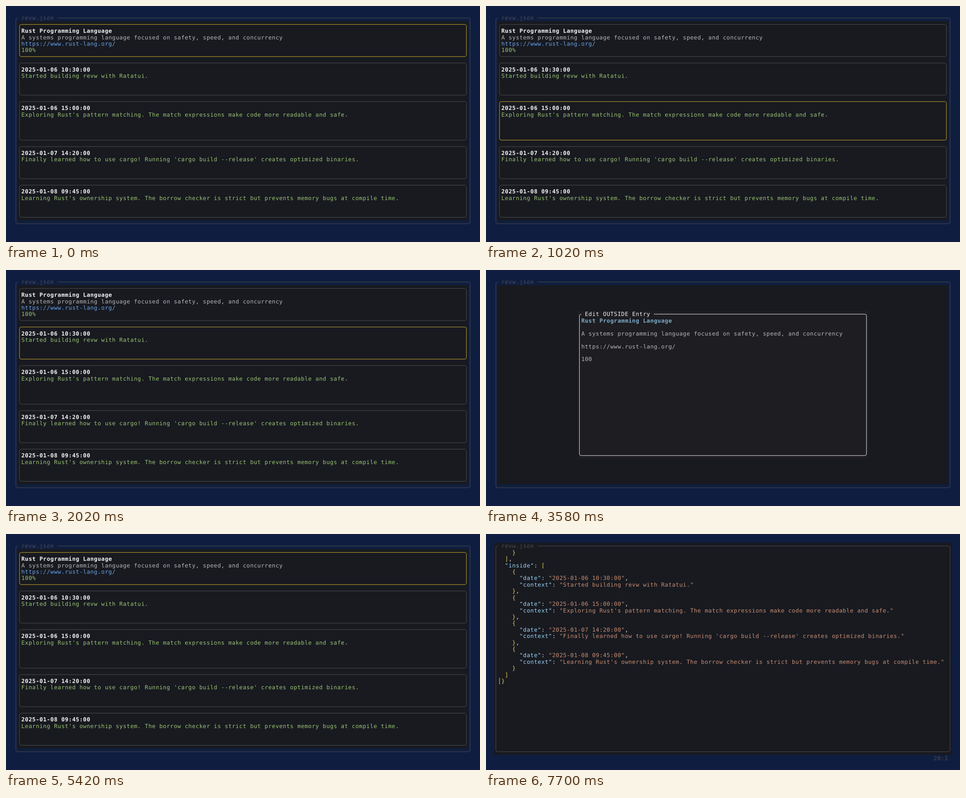
Write an HTML page that moves like this. It is 1058 px wide and 529 px high and loops after 8 s.

```html
<!DOCTYPE html>
<html lang="en">
<head>
<meta charset="utf-8">
<title>revw.json</title>
<style>
html, body { margin: 0; height: 100%; overflow: hidden; background: #0f1e40; }
svg { display: block; width: 100%; height: 100%; }
text {
  font: 12.6px "DejaVu Sans Mono", monospace;
  letter-spacing: calc(8.11px - .60205em);
  text-rendering: geometricPrecision;
  white-space: pre;
}
path { fill: none; stroke-width: 1; }
.bold { font-weight: bold; }
</style>
</head>
<body>
<svg id="stage" viewBox="0 0 1058 529"></svg>
<script>
const LOOP = 8000, CELL_W = 8.11, CELL_H = 14.41, RADIUS = 4;
const GRAY = '#4d4d4d', YELLOW = '#cfac30', GREEN = '#9bc274', SILVER = '#b6b6b6';
const DARK = '#181a20', POPUP = '#1e1d21';
const stage = document.getElementById('stage');

const data = {
  outside: [{
    name: 'Rust Programming Language',
    context: 'A systems programming language focused on safety, speed, and concurrency',
    url: 'https://www.rust-lang.org/',
    percentage: 100
  }],
  inside: [
    ['2025-01-06 10:30:00', 'Started building revw with Ratatui.'],
    ['2025-01-06 15:00:00', "Exploring Rust's pattern matching. The match expressions make code more readable and safe."],
    ['2025-01-07 14:20:00', "Finally learned how to use cargo! Running 'cargo build --release' creates optimized binaries."],
    ['2025-01-08 09:45:00', "Learning Rust's ownership system. The borrow checker is strict but prevents memory bugs at compile time."]
  ].map(([date, context]) => ({ date, context }))
};
const topic = data.outside[0];
const lines = JSON.stringify(data, null, 2).split('\n');
const cardRows = [[1, 6], [7, 12], [13, 19], [20, 25], [26, 31]];

// Left and top edge of a terminal cell
const px = col => 18 + col * CELL_W;
const py = row => 19.7 + row * CELL_H;

const text = (col, row, str, color, cls = '') =>
  `<text x="${px(col)}" y="${py(row) + 11.7}" fill="${color}" class="${cls}">${str}</text>`;

const fill = (c1, r1, c2, r2, color) =>
  `<rect x="${px(c1)}" y="${py(r1)}" width="${(c2 - c1 + 1) * CELL_W}" height="${(r2 - r1 + 1) * CELL_H}" fill="${color}"/>`;

// Rounded border through cell centres, with an optional title in the top line
function border(c1, r1, c2, r2, color, title = '') {
  const [l, t, r, b] = [px(c1 + .5), py(r1 + .5), px(c2 + .5), py(r2 + .5)];
  const k = RADIUS, start = title ? px(c1 + title.length + 3) : l + k;
  return `<path stroke="${color}" d="M${start} ${t}H${r - k}q${k} 0 ${k} ${k}V${b - k}q0 ${k} ${-k} ${k}` +
    `H${l + k}q${-k} 0 ${-k} ${-k}V${t + k}q0 ${-k} ${k} ${-k}"/>` +
    text(c1 + 2, r1, title, color);
}

const windowBorder = () => border(0, 0, 125, 32, GRAY, 'revw.json');

function cards(selected) {
  let out = fill(1, 1, 124, 31, DARK) + windowBorder();
  cardRows.forEach(([top, bottom], i) => {
    out += border(1, top, 124, bottom, i === selected ? YELLOW : GRAY);
    if (!i) return;
    const { date, context } = data.inside[i - 1];
    out += text(2, top + 1, date, '#f4f4f4', 'bold') + text(2, top + 2, context, GREEN);
  });
  return out + text(2, 2, topic.name, '#f4f4f4', 'bold') + text(2, 3, topic.context, SILVER) +
    text(2, 4, topic.url, '#67a3ea') + text(2, 5, topic.percentage + '%', GREEN);
}

function editor() {
  return fill(1, 1, 124, 31, DARK) + windowBorder() + fill(23, 5, 102, 27, POPUP) +
    border(23, 5, 102, 27, '#f0f0f0', 'Edit OUTSIDE Entry') +
    text(24, 6, topic.name, '#7babc9', 'bold') + text(24, 8, topic.context, SILVER) +
    text(24, 10, topic.url, SILVER) + text(24, 12, topic.percentage, SILVER);
}

function tokenColor(token, isKey) {
  if (token[0] === '"') return isKey ? '#9cd5f5' : '#c98d73';
  if (/\d/.test(token)) return '#b5cea8';
  return /[{}[\]]/.test(token) ? '#e9ca5c' : '#dedede';
}

function json(cursorLine, scroll) {
  let out = fill(0, 0, 125, 32, DARK) + windowBorder();
  lines.slice(scroll).forEach((line, i) => {
    const row = i + 1, atCursor = i + scroll + 1 === cursorLine;
    for (const m of line.matchAll(/"[^"]*"|\d+|[{}[\]]|[:,]/g)) {
      const isKey = line[m.index + m[0].length] === ':';
      out += text(m.index + (atCursor ? 2 : 1), row, m[0], tokenColor(m[0], isKey));
    }
    if (atCursor) out += `<path stroke="#d8d8d8" d="M${px(1.5)} ${py(row)}v${CELL_H}"/>`;
  });
  const status = cursorLine + ':1';
  return out + text(125 - status.length, 33, status, GRAY);
}

const scenes = [
  [0, cards(0)], [500, cards(1)], [1020, cards(2)], [2020, cards(1)], [2580, cards(0)],
  [3580, editor()], [5420, cards(0)], [6380, json(1, 0)], [7700, json(28, 7)]
];

let shown;
function tick() {
  const time = performance.now() % LOOP;
  const scene = scenes.findLast(([start]) => start <= time);
  if (scene !== shown) stage.innerHTML = (shown = scene)[1];
  requestAnimationFrame(tick);
}
tick();
</script>
</body>
</html>
```
